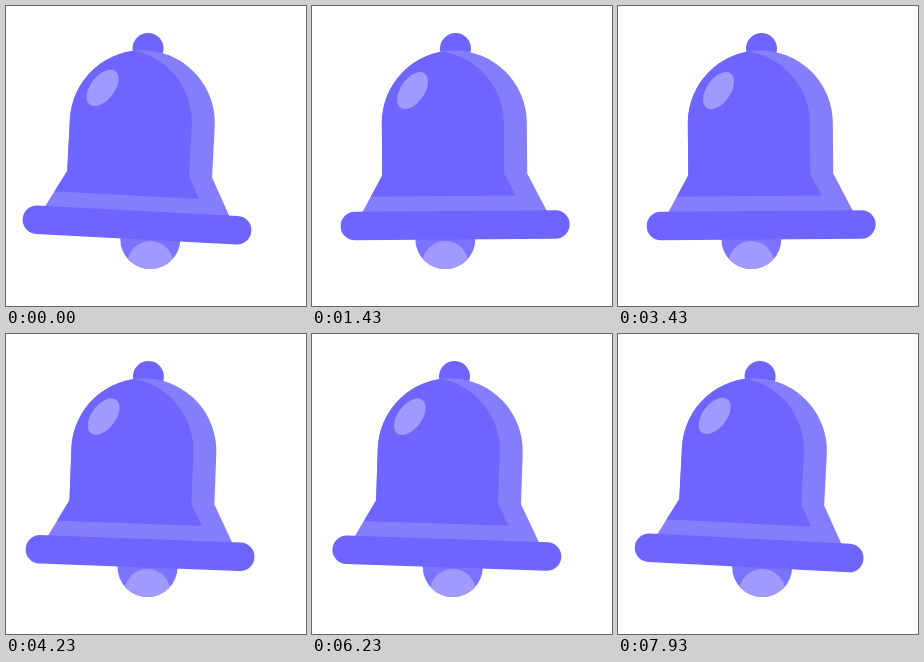
Animation, 300 px wide and 300 px high, one loop 8.01 s. Source, as an HTML page:

```html
<!DOCTYPE html>
<html lang="en">
<head>
<meta charset="utf-8">
<title>Ringing bell</title>
<style>
  html, body { margin: 0; width: 100%; height: 100%; overflow: hidden; background: #fff; }
  svg { display: block; width: 100vw; height: 100vh; }
  .main { fill: #6e65ff; }
  .side { fill: #857efc; }
  .shine { fill: #a09afe; }
</style>
</head>
<body>
<svg viewBox="0 0 300 300">
  <defs>
    <path id="shell" d="M69 117A72.5 72.5 0 0 1 214 117V168L234 207V215H48V207L69 169Z"/>
    <clipPath id="inShell"><use href="#shell"/></clipPath>
    <clipPath id="inClapper"><circle cy="233" r="30"/></clipPath>
  </defs>
  <g id="clapper">
    <circle cy="233" r="30" fill="#7b73fd"/>
    <circle cy="258" r="23" class="shine" clip-path="url(#inClapper)"/>
  </g>
  <g id="bell">
    <circle cx="143.3" cy="42.5" r="15.5" class="main"/>
    <use href="#shell" class="side"/>
    <path class="main" clip-path="url(#inShell)"
          d="M20 190V44.5H118.5A72.5 72.5 0 0 1 191 117V168L202.3 190Z"/>
    <ellipse class="shine" rx="21" ry="12" transform="translate(100 84.2) rotate(-55)"/>
    <rect class="main" x="27" y="205" width="229" height="28.5" rx="14.2"/>
  </g>
</svg>
<script>
  const LOOP = 8010, SWING = 2000, TILT = 3;
  const bell = document.getElementById('bell');
  const clapper = document.getElementById('clapper');
  const start = performance.now();

  // Poses are 50 ms apart, held alternately for 30 and 70 ms.
  function poseTime(ms) {
    const t = Math.min(ms % LOOP, 7999);
    return Math.floor(t / 100) * 100 + (t % 100 >= 30 ? 50 : 0);
  }

  // Every second swing sets off slightly early.
  function lead(t) {
    const u = (t % (2 * SWING) - SWING) / 800;
    return u > 0 && u < 1 ? 40 * Math.sin(Math.PI * u) : 0;
  }

  function draw(now) {
    const t = poseTime(Math.max(0, now - start));
    const swing = Math.cos(2 * Math.PI * (t + lead(t)) / SWING);
    bell.setAttribute('transform', `rotate(${TILT * swing} 142.8 18)`);
    clapper.setAttribute('transform', `translate(${134.8 + 9.5 * swing} 0)`);
    requestAnimationFrame(draw);
  }
  draw(start);
</script>
</body>
</html>
```
